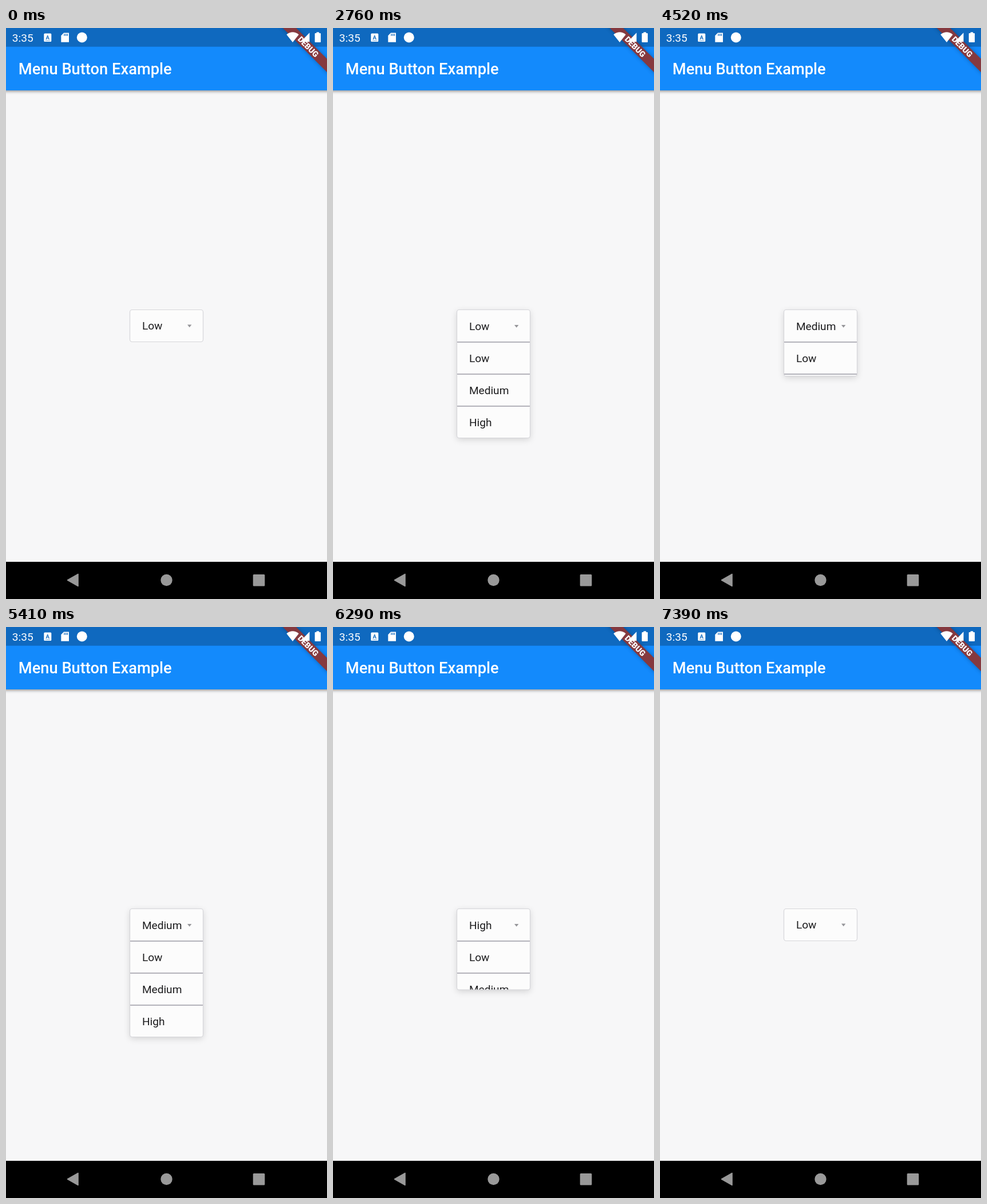
An HTML page with a canvas that plays this animation: 561 by 998 pixels, repeating every 7500 ms.

```html
<!DOCTYPE html>
<html lang="en">
<head>
<meta charset="utf-8">
<title>Menu Button Example</title>
<style>
html, body { margin: 0; width: 100%; height: 100%; overflow: hidden; background: #000; }
canvas { display: block; width: 561px; height: 998px; }
</style>
</head>
<body>
<canvas id="stage" width="561" height="998"></canvas>
<script>
const ctx = document.getElementById('stage').getContext('2d');
const W = 561, H = 998, LOOP = 7500, TICK = 110, SLIDE = 300;
const ROW = 56, LEFT = 216.5, TOP = 492.5, WIDTH = 128;
const FONT = 'Roboto, "Noto Sans", sans-serif';
const ITEMS = ['Low', 'Medium', 'High'];

// Each move is sampled every TICK from `at`; the slide itself starts at `begin`.
const moves = [
  { at: 2320, begin: 2390, open: true, label: 'Low' },
  { at: 3200, begin: 3192, open: false, label: 'Low', next: 'Medium' },
  { at: 4410, begin: 4413, open: true, label: 'Medium' },
  { at: 5300, begin: 5430, open: false, label: 'Medium', next: 'High' },
  { at: 6070, begin: 6137, open: true, label: 'High' },
  { at: 7060, begin: 7080, open: false, label: 'High', next: 'Low' }
];

function stateAt(t) {
  const move = moves.filter(m => m.at <= t).pop();
  if (!move) return { open: 0, label: 'Low' };
  const time = move.at + Math.floor((t - move.at) / TICK) * TICK;
  const p = Math.min(1, Math.max(0, (time - move.begin) / SLIDE));
  const open = move.open ? p : 1 - p;
  return { open, label: !move.open && open === 0 ? move.next : move.label };
}

function rect(x, y, w, h, color) {
  ctx.fillStyle = color;
  ctx.fillRect(x, y, w, h);
}

function rounded(x, y, w, h, r) {
  ctx.beginPath();
  ctx.roundRect(x, y, w, h, r);
}

function poly(color, ...pts) {
  ctx.beginPath();
  pts.forEach(([x, y]) => ctx.lineTo(x, y));
  ctx.closePath();
  ctx.fillStyle = color;
  ctx.fill();
}

function disc(x, y, r, color) {
  ctx.beginPath();
  ctx.arc(x, y, r, 0, Math.PI * 2);
  ctx.fillStyle = color;
  ctx.fill();
}

function text(str, x, y, size, color, weight = 400, align = 'left') {
  ctx.font = `${weight} ${size}px ${FONT}`;
  ctx.textAlign = align;
  ctx.fillStyle = color;
  ctx.fillText(str, x, y);
}

function shadow(color, blur, dy) {
  ctx.shadowColor = color;
  ctx.shadowBlur = blur;
  ctx.shadowOffsetY = dy;
}

function appBar() {
  ctx.save();
  shadow('rgba(0,0,0,0.4)', 5, 2);
  rect(-10, 0, W + 20, 109, '#138afc');
  ctx.restore();
  rect(0, 0, W, 32.7, '#0f69bf');
  text('Menu Button Example', 21.8, 81, 27.27, '#fff', 500);
}

function banner() {
  ctx.save();
  ctx.translate(W, 0);
  ctx.rotate(Math.PI / 4);
  ctx.save();
  shadow('rgba(0,0,0,0.3)', 7, 0);
  rect(-60, 38.2, 120, 16.4, '#85393f');
  ctx.restore();
  text('DEBUG', 0, 51.3, 13.9, '#fff', 900, 'center');
  ctx.restore();
}

function statusIcons() {
  text('3:35', 10.8, 24, 19.1, '#fff');

  rounded(66.3, 9.5, 13, 14.5, 1.5);
  ctx.fillStyle = '#fff';
  ctx.fill();
  text('A', 72.8, 19.6, 9.5, '#0f69bf', 700, 'center');
  for (let i = 0; i < 3; i++) rect(69.5 + i * 2.6, 21.3, 1.3, 1.2, '#0f69bf');

  poly('#fff', [101, 8.5], [110, 8.5], [110, 24.7], [96.3, 24.7], [96.3, 13.3]);
  for (let i = 0; i < 3; i++) rect(101.3 + i * 2.7, 10.3, 1.4, 3.4, '#0f69bf');

  disc(132.8, 16.5, 9, '#fff');

  ctx.beginPath();
  ctx.moveTo(501, 25);
  ctx.lineTo(490.3, 11.5);
  ctx.quadraticCurveTo(501, 3.2, 511.7, 11.5);
  ctx.closePath();
  ctx.fill();
  poly('#fff', [515, 24.3], [530.5, 24.3], [530.5, 8.3]);
  rect(542.6, 7.3, 4.6, 3, '#fff');
  rounded(539.7, 9, 10.4, 16, 1);
  ctx.fill();
}

function navBar() {
  const grey = '#999';
  rect(0, 933, W, 65, '#000');
  poly(grey, [107.5, 965], [126, 954.5], [126, 975.5]);
  ctx.strokeStyle = grey;
  ctx.lineWidth = 1.6;
  ctx.lineJoin = 'round';
  ctx.stroke();
  disc(280.5, 965, 10.2, grey);
  rounded(431.7, 955, 20.6, 20.6, 1.5);
  ctx.fill();
}

function menu({ open, label }) {
  const height = ROW + open * ROW * ITEMS.length;
  const shift = open > 0 ? 0.5 : 0;
  const ink = '#1c1c1e';

  ctx.save();
  if (open > 0) shadow('rgba(0,0,0,0.15)', 12, 3);
  rounded(LEFT, TOP, WIDTH, height, 4);
  ctx.fillStyle = '#fcfcfc';
  ctx.fill();
  ctx.restore();

  ctx.save();
  rounded(LEFT, TOP, WIDTH, height, 4);
  ctx.clip();
  text(label, 237.9, 527.3 + shift, 19.1, ink);
  const ay = 518.6 + shift;
  poly('#96969a', [317, ay], [324.4, ay], [320.7, ay + 4.6]);
  if (open > 0) {
    ITEMS.forEach((item, i) => {
      const y = TOP + ROW * (i + 1);
      rect(LEFT, y - 0.2, WIDTH, 1.3, '#8e8c98');
      text(item, 237.9, y + 35.1, 19.1, ink);
    });
  }
  ctx.restore();

  rounded(LEFT, TOP, WIDTH, height, 4);
  ctx.strokeStyle = '#d6d6da';
  ctx.lineWidth = 1.2;
  ctx.stroke();
}

function draw(t) {
  rect(0, 0, W, H, '#f7f7f8');
  appBar();
  banner();
  statusIcons();
  menu(stateAt(t));
  navBar();
}

const start = performance.now();
function frame(now) {
  draw(Math.max(0, now - start) % LOOP);
  requestAnimationFrame(frame);
}
draw(0);
requestAnimationFrame(frame);
</script>
</body>
</html>
```
